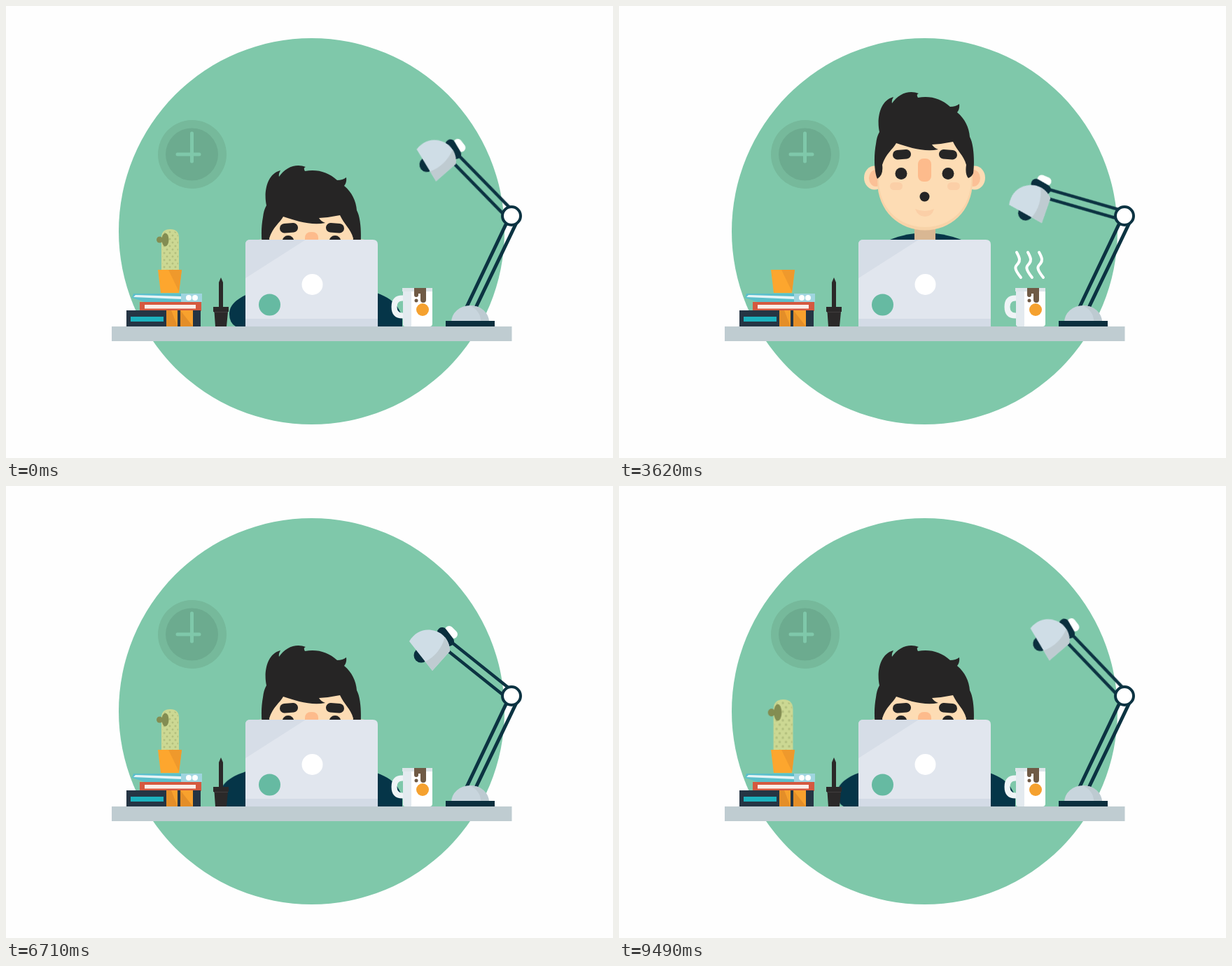
These frames come from a looping animation (867 by 646 pixels, 9560 ms). An HTML page without scripts:

```html
<!DOCTYPE html>
<html lang="en">
<head>
<meta charset="utf-8">
<title>At the desk</title>
<style>
  html, body { margin: 0; width: 100%; height: 100%; overflow: hidden; background: #fefefe; }
  svg { display: block; width: 100vw; height: 100vh; }

  .head, .hair, .eyes, .smile, .ooh, .lamp, .cactus, .steam, .sleeve-l, .sleeve-r {
    animation: 4.78s ease-in-out infinite;
  }
  .head { animation-name: pop; }
  .hair { animation-name: hair; }
  .eyes { animation-name: eyes; }
  .smile { animation-name: smile; animation-timing-function: step-end; }
  .ooh { animation-name: ooh; animation-timing-function: step-end; }
  .lamp { animation-name: lamp; transform-origin: 722px 300px; }
  .cactus { animation-name: cactus; transform-origin: 234px 377px; }
  .steam { animation-name: steam; animation-timing-function: linear; stroke-dasharray: 42px 126px; }
  .sleeve-l { animation-name: tuck-l; }
  .sleeve-r { animation-name: tuck-r; }
  /* 13 strokes per cycle */
  .type { animation: type calc(4.78s / 26) ease-in-out infinite alternate; }

  @keyframes pop {
    0%, 45% { transform: translateY(105px); }
    50.5% { transform: translateY(-5px); }
    53.3%, 69.7% { transform: translateY(3px); }
    75.7%, 84.7% { transform: none; }
    91%, 100% { transform: translateY(105px); }
  }
  @keyframes hair {
    0%, 48%, 66%, 100% { transform: none; }
    52%, 62% { transform: translateY(-6px); }
  }
  @keyframes eyes {
    0%, 62% { transform: translateY(-8px); }
    69.7% { transform: translateY(-7px); }
    75%, 85% { transform: none; }
    90%, 100% { transform: translateY(-8px); }
  }
  @keyframes smile { 0% { opacity: 1; } 62.5%, 100% { opacity: 0; } }
  @keyframes ooh { 0% { opacity: 0; } 62.5%, 100% { opacity: 1; } }
  @keyframes lamp {
    0%, 6% { transform: rotate(7deg); }
    14%, 61% { transform: none; }
    66% { transform: rotate(-26deg); }
    69.7% { transform: rotate(-24.8deg); }
    75.7%, 85% { transform: rotate(-22.6deg); }
    93% { transform: rotate(10deg); }
    98.5% { transform: rotate(7.6deg); }
    100% { transform: rotate(7deg); }
  }
  @keyframes cactus {
    0%, 61% { transform: none; }
    63.5% { transform: scale(1.1, 1.24); }
    66.5%, 94% { transform: scale(.7, 0); }
    98.5% { transform: scale(1.12, 1.24); }
    100% { transform: none; }
  }
  @keyframes steam {
    0%, 15% { stroke-dashoffset: 46px; }
    18.8% { stroke-dashoffset: 15px; }
    21.5%, 26% { stroke-dashoffset: 0px; }
    33% { stroke-dashoffset: -46px; }
    33.01%, 66% { stroke-dashoffset: 46px; }
    69.7% { stroke-dashoffset: 27px; }
    74.5%, 86% { stroke-dashoffset: 0px; }
    93% { stroke-dashoffset: -46px; }
    93.01%, 100% { stroke-dashoffset: 46px; }
  }
  @keyframes tuck-l {
    0%, 44% { transform: none; }
    48%, 87% { transform: translateX(70px); }
    92%, 100% { transform: none; }
  }
  @keyframes tuck-r {
    0%, 44% { transform: none; }
    48%, 87% { transform: translateX(-60px); }
    92%, 100% { transform: none; }
  }
  @keyframes type { to { transform: translateX(-25px); } }
</style>
</head>
<body>
<svg viewBox="0 0 867 646" preserveAspectRatio="none">
  <defs>
    <clipPath id="above"><rect width="867" height="458"/></clipPath>
    <pattern id="spots" width="8" height="10" patternUnits="userSpaceOnUse">
      <circle cx="2" cy="3" r="1.5" fill="#b3c07e"/>
      <circle cx="6" cy="8" r="1.5" fill="#b3c07e"/>
    </pattern>
  </defs>

  <ellipse cx="436.5" cy="322" rx="275.5" ry="276" fill="#7fc8aa"/>

  <!-- clock -->
  <circle cx="266" cy="212" r="49" fill="#76b99b"/>
  <circle cx="265.5" cy="212" r="37.5" fill="#6cab8f"/>
  <path d="M265.5 182V222M245 212H276" stroke="#7fc8aa" stroke-width="5" stroke-linecap="round"/>

  <!-- person -->
  <g clip-path="url(#above)">
    <g fill="#053548">
      <g class="sleeve-l"><path class="type" d="M420 396C372 401 319 412 319 440Q319 453 328 458H420Z"/></g>
      <path class="sleeve-r" d="M480 399C535 408 556 416 566 444V458H480Z"/>
    </g>
    <g class="head">
      <path d="M387 334Q412 324 437 324T489 334L510 350V458H364V350Z" fill="#053548"/>
      <path d="M422 310H452V334Q437 338 422 334Z" fill="#d9b793"/>
      <g fill="#fddcb4">
        <ellipse cx="365" cy="245.5" rx="15" ry="17"/>
        <ellipse cx="508" cy="245.5" rx="15" ry="17"/>
      </g>
      <g fill="#fbc096">
        <ellipse cx="367" cy="246" rx="10" ry="12"/>
        <ellipse cx="506" cy="246" rx="10" ry="12"/>
      </g>
      <path d="M388 185H484L505 215V250C505 294 473 320.5 437 320.5S369 294 369 250V215Z" fill="#f8d3a8"/>
      <path d="M388 185H484L503 215V248C503 290 473 316 437 316S371 290 371 248V215Z" fill="#fddcb4"/>
      <g fill="#fbcfa7">
        <rect x="387" y="252" width="18" height="11" rx="5.5"/>
        <rect x="469" y="252" width="18" height="11" rx="5.5"/>
        <path d="M423 290Q437 296 450 290Q447 301 437 301T423 290Z"/>
      </g>
      <rect x="427" y="218" width="19" height="33" rx="8" fill="#fdbb8c"/>
      <g class="smile">
        <path d="M417 265H456Q454 285 436.5 285T417 265Z" fill="#262525"/>
        <path d="M417 265H456L454.5 271.5H418.5Z" fill="#fff"/>
      </g>
      <circle class="ooh" cx="436.5" cy="272.5" r="7" fill="#262525"/>
      <g fill="#262525">
        <g class="eyes"><circle cx="403" cy="239.5" r="8.5"/><circle cx="470" cy="239.5" r="8.5"/></g>
        <path class="hair" d="M369 247C364 236 364 212 367 197Q368 187 372 180C368 162 372 135 392 130Q389 135 390 139C399 125 415 119.5 428 125Q424 126 427 131C444 128 460 132 473 144Q481 144 486 140Q487 147 483 152C494 161 500 174 501 187C507 198 508 222 506 239Q504 244 499 246Q494 241 496 227C492 213 483 207 477 194Q463 197 447 198Q450 203 456 205C436 209 414 202 396 196C391 205 381 211 376 227Q378 242 369 247Z"/>
        <rect x="391" y="205.5" width="26" height="13.5" rx="6.5" transform="rotate(-4 404 212)"/>
        <rect x="457" y="205.5" width="26" height="13.5" rx="6.5" transform="rotate(4 470 212)"/>
      </g>
    </g>
  </g>

  <!-- laptop -->
  <path d="M342 458V341Q342 334 349 334H524Q531 334 531 341V458Z" fill="#e1e6ee"/>
  <path d="M342 389V341Q342 334 349 334H428Z" fill="#d6dde7"/>
  <rect x="342" y="447" width="189" height="11" fill="#d3dbe6"/>
  <circle cx="437.5" cy="398" r="15" fill="#fff"/>
  <circle cx="376.5" cy="427" r="15.5" fill="#66baa2"/>

  <!-- cactus -->
  <g class="cactus">
    <path d="M222 380V331Q222 319 234.5 319T247 331V380Z" fill="#ccd893"/>
    <path d="M223 378V331Q223 321 234.5 321T246 331V378Z" fill="url(#spots)"/>
    <ellipse cx="227.5" cy="334" rx="5" ry="9.5" fill="#838d52"/>
    <circle cx="219.5" cy="334" r="4.5" fill="#838d52"/>
  </g>
  <path d="M217 377H251L247 410H221Z" fill="#fda62e"/>
  <path d="M232 377H251L247 408Z" fill="#ef992c"/>

  <!-- books -->
  <path d="M182 411H280V423H198L180 417Z" fill="#5bbfcb"/>
  <path d="M185 413L250 415V419L182 416Z" fill="#e6f4f6"/>
  <path d="M250 411H280V423H250Z" fill="#9fd5df"/>
  <circle cx="261" cy="417" r="4" fill="#fff"/>
  <circle cx="270" cy="417" r="4" fill="#fff"/>
  <rect x="191" y="423" width="88" height="13" fill="#d5593f"/>
  <rect x="198" y="427" width="73" height="5.5" fill="#fbeee8"/>
  <rect x="172" y="435" width="106" height="23" fill="#253544"/>
  <rect x="178" y="444" width="47" height="7" fill="#1db1bd"/>
  <path d="M229 435H245V458H229ZM249 435H267V458H249Z" fill="#f8a12d"/>
  <path d="M229 435H236L245 458H229ZM249 435L267 458H249Z" fill="#e48e28"/>

  <!-- pen cup -->
  <g fill="#2b2929">
    <path d="M304 432V395L307 388L310 395V432Z"/>
    <path d="M296 430H318V437H317L315 458H299L297.5 437H296Z"/>
  </g>
  <path d="M297 437.5H317" stroke="#413e3e" stroke-width="1"/>

  <!-- mug -->
  <path class="steam" fill="none" stroke="#fff" stroke-width="4" stroke-linecap="round"
    d="M574 388c-12-15-7-16-4-20s3-7-2-16M590 388c-12-15-7-16-4-20s3-7-2-16M606 388c-12-15-7-16-4-20s3-7-2-16"/>
  <path d="M570 417.5H566Q554.5 417.5 554.5 430T566 442.5H570" fill="none" stroke="#eff4f6" stroke-width="8"/>
  <path d="M567 403H609V454Q609 458 605 458H571Q567 458 567 454Z" fill="#fff"/>
  <path d="M567 403H579V458H571Q567 458 567 454Z" fill="#e3eaef"/>
  <rect x="566" y="403" width="43" height="5" fill="#dce5e9"/>
  <path d="M583 403H600V420Q600 424 596 424T592 420V411H589V413Q589 416 586 416T583 413Z" fill="#6f5a45"/>
  <circle cx="586" cy="421" r="2.5" fill="#6f5a45"/>
  <circle cx="595" cy="434" r="9" fill="#f5a12f"/>

  <!-- lamp -->
  <path d="M658 430L715 310M671 431L728.5 311" stroke="#0c3342" stroke-width="5"/>
  <path d="M636 452A27 24 0 0 1 690 452Z" fill="#c8d5dd"/>
  <path d="M663 428A27 24 0 0 1 690 452H678Q679 437 663 428Z" fill="#bdcad1"/>
  <rect x="628" y="450" width="70" height="8" fill="#0b2f3e"/>
  <g class="lamp">
    <path d="M604 293.5H716M604 306.5H716" transform="rotate(38.7 722 300)" stroke="#0c3342" stroke-width="4.5"/>
    <path d="M633 206L639 212" stroke="#fff" stroke-width="12" stroke-linecap="round"/>
    <path d="M623 209L633 222" stroke="#0b2f3e" stroke-width="14" stroke-linecap="round"/>
    <circle cx="593" cy="242" r="10.5" fill="#0b2f3e"/>
    <path d="M576 222C584 209 596 204 608 206C624 208 634 221 634 236L609 264Z" fill="#cfdde6"/>
    <path d="M627 216Q634 225 634 236L609 264L599 251Q620 240 627 216Z" fill="#bfcbd1"/>
  </g>
  <circle cx="722" cy="300" r="13" fill="#fff" stroke="#0c3342" stroke-width="4"/>

  <rect x="151" y="458" width="571.5" height="21" fill="#bfccd1"/>
</svg>
</body>
</html>
```
